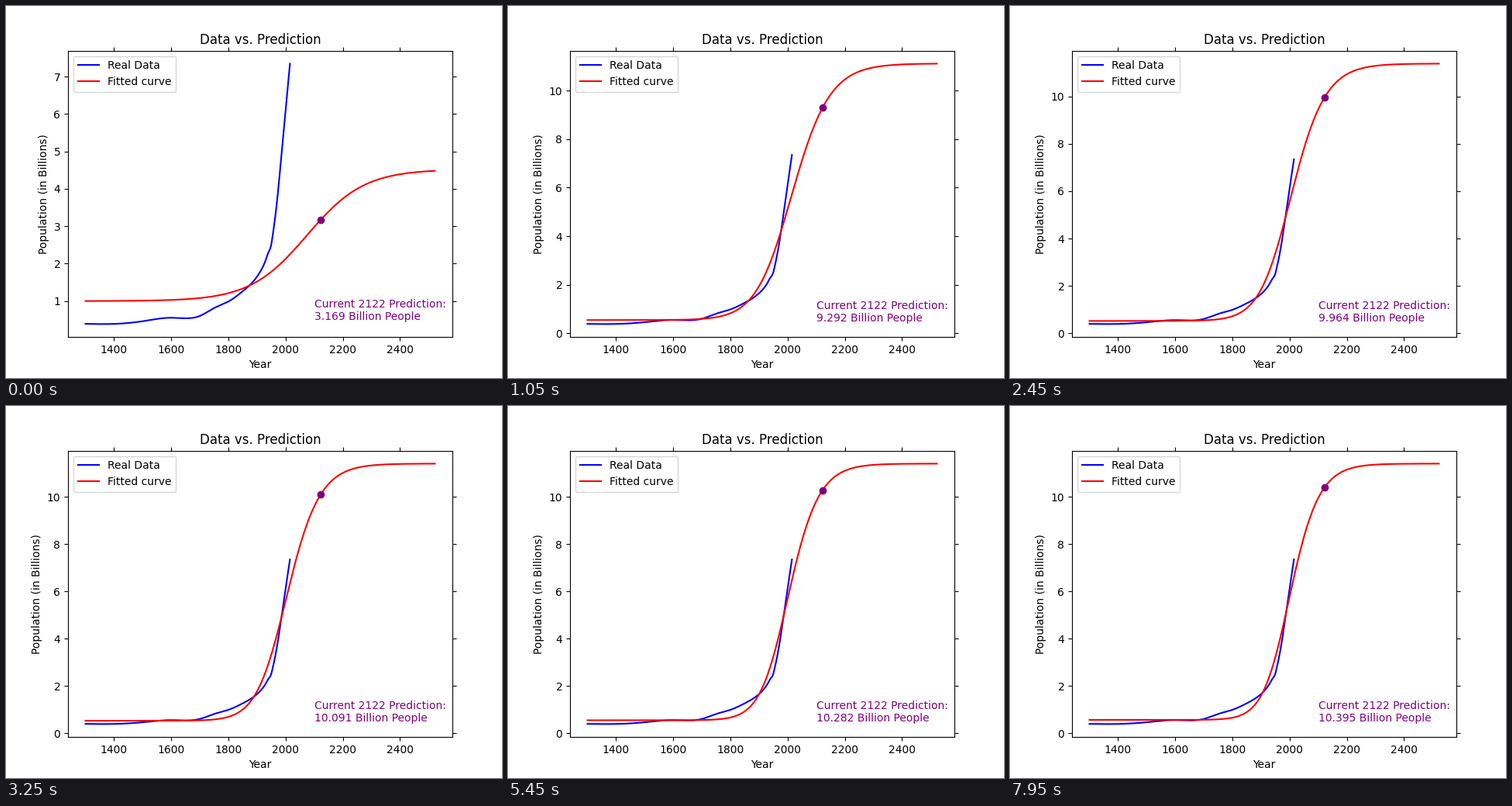
A matplotlib script that plays this animation: 640 by 480 pixels, repeating every 8 s.

```python
import numpy as np
import matplotlib.pyplot as plt
from matplotlib.animation import FuncAnimation

FRAMES, INTERVAL = 160, 50
NOW = 2122


def natural_spline(x, y):
    """Return a function for the natural cubic spline through (x, y)."""
    x, y = np.asarray(x, float), np.asarray(y, float)
    n, h = len(x), np.diff(x)
    slope = np.diff(y) / h
    a, b = np.eye(n), np.zeros(n)
    for i in range(1, n - 1):
        a[i, i - 1:i + 2] = h[i - 1], 2 * (h[i - 1] + h[i]), h[i]
        b[i] = 6 * (slope[i] - slope[i - 1])
    m = np.linalg.solve(a, b)

    def value(q):
        i = np.clip(np.searchsorted(x, q, side="right") - 1, 0, n - 2)
        l, r = x[i + 1] - q, q - x[i]
        return ((m[i] * l**3 + m[i + 1] * r**3) / (6 * h[i])
                + (y[i] / h[i] - m[i] * h[i] / 6) * l
                + (y[i + 1] / h[i] - m[i + 1] * h[i] / 6) * r)

    return value


# World population in billions at a few key years
key_years = [*range(1300, 1700, 100), *range(1700, 1900, 50),
             1900, 1920, 1930, 1940, 1950, 1952, 1970, 1990, 2015]
key_counts = [0.392, 0.390, 0.461, 0.554, 0.603, 0.814, 0.989, 1.263,
              1.654, 1.912, 2.092, 2.307, 2.525, 2.619, 3.683, 5.310, 7.349]
real_years = np.arange(1300, 2016)
real = natural_spline(key_years, key_counts)(real_years)
years = np.arange(1300, NOW + 401)


def settle(step, final, fast, mid, slow):
    """Approach a final value in three exponential phases."""
    return (final + fast * np.exp(-step / 3) + mid * np.exp(-step / 11.5)
            + slow * np.exp(-step / 78))


def fitted(step):
    """Prediction for NOW and the generalised logistic curve at this step."""
    pred = settle(step, 10.52, -3.3484, -3.04, -0.9626)
    top = settle(step, 11.392, -4.962, -1.957, 0.05)
    floor = settle(step, 0.576, 0.121, 0.427, -0.124)
    rate = settle(step, 0.01925, -0.003, 0, -0.00625)
    skew = settle(step, 0.69, 0, 0.21, 0.1)
    # Place the curve so that it passes through the prediction
    odds = ((top - floor) / (pred - floor)) ** skew - 1
    decay = odds * np.exp(-rate * (years - NOW))
    return pred, floor + (top - floor) * (1 + decay) ** (-1 / skew)


plt.rcParams.update({"xtick.top": True, "ytick.right": True})
fig, ax = plt.subplots(figsize=(6.4, 4.8), dpi=100)
ax.plot(real_years, real, color="blue", label="Real Data")
curve, = ax.plot(years, fitted(0)[1], color="red", label="Fitted curve")
dot, = ax.plot([NOW], [fitted(0)[0]], "o", color="purple")
note = ax.text(2100, 0.5, "", color="purple")
ax.set_title("Data vs. Prediction")
ax.set_xlabel("Year")
ax.set_ylabel("Population (in Billions)")
ax.legend(loc="upper left")


def update(step):
    pred, values = fitted(step)
    curve.set_ydata(values)
    dot.set_ydata([pred])
    note.set_text(f"Current {NOW} Prediction:\n{pred:.3f} Billion People")
    ax.relim()
    ax.autoscale_view()
    return curve, dot, note


anim = FuncAnimation(fig, update, frames=FRAMES, interval=INTERVAL,
                     init_func=lambda: update(0), repeat=True, repeat_delay=0)
plt.show()
```
